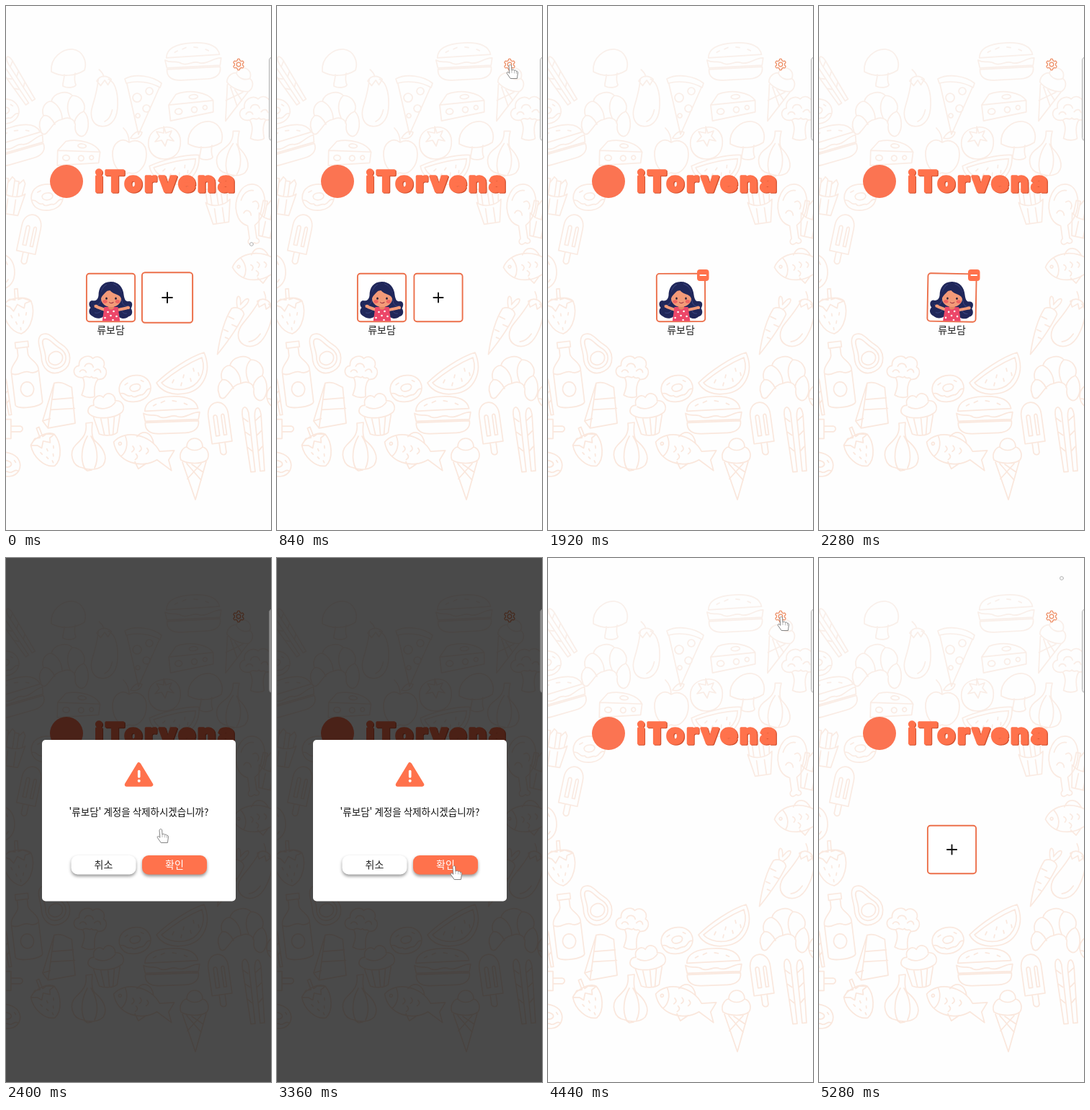
An HTML page with a canvas for the animation above (5.4 s loop, 368 by 726 pixels).

```html
<!DOCTYPE html>
<html lang="ko">
<head>
<meta charset="utf-8">
<title>Account removal</title>
<style>
html, body { margin: 0; width: 100%; height: 100%; overflow: hidden; background: #fefefe; }
canvas { display: block; width: 368px; height: 726px; }
</style>
</head>
<body>
<canvas id="stage"></canvas>
<script>
const W = 368, H = 726, LOOP = 5400, STEP = 120;
const ORANGE = '#ff724c', FRAME = '#ec704b';
const KOREAN = '"Noto Sans CJK KR", "Noto Sans CJK JP", "Noto Sans CJK", sans-serif';
const USER = '류보담';
const ratio = window.devicePixelRatio || 1;

function fit(canvas) {
  canvas.width = W * ratio;
  canvas.height = H * ratio;
  const c = canvas.getContext('2d');
  c.scale(ratio, ratio);
  return c;
}
const ctx = fit(document.getElementById('stage'));

const food = {
  mushroom: 'M-24 6C-26-14-8-26 6-25 20-23 26-8 22 4 10 12-10 14-24 6ZM-6 10C-6 18-9 22-8 26 0 30 10 27 10 24 8 20 8 14 9 8',
  burger: 'M-37-7C-36-22-20-26 0-26 22-26 35-20 37-8ZM-39-4C-30 2-24-4-16 2-8 6 0-2 8 2 18 6 28-4 39-3L37 7H-37L-39-4M-37 9C-38 20-30 25-18 25H18C32 25 38 18 37 9ZM-14-18l5-2M2-20l5 1M18-16l4 2M-25-14l4-2',
  eggplant: 'M2-26C14-22 18-2 18 14 18 32 8 40-2 40-14 40-20 28-17 14-14 0-12-10-12-24M-14-22C-10-30-2-32 6-26L2-18-3-24-8-16ZM-5-29C-6-34-10-36-12-38M11 16C10 24 7 30 2 33',
  pizza: 'M-25-34C-10-42 14-38 26-28L24-22C10-30-8-32-23-28ZM-22-27L-6 43 23-22M-8-14a6 6 0 1 0 .1 0M9-22a5 5 0 1 0 .1 0M5 2a5 5 0 1 0 .1 0M-7 14a3 3 0 1 0 .1 0',
  croissant: 'M-32 22C-36 12-32 6-28 2-32-10-24-18-17-18-14-30 4-34 12-26 24-26 32-14 28-4 36 4 36 20 30 28 24 34 16 28 16 18 18 8 8 2-2 7-12 8-16 18-22 24-26 30-31 28-32 22ZM-28 2C-22 0-16 6-12 14M-17-18C-8-14-2-4-2 7M12-26C4-18 4-6 9 5M28-4C22-2 16 4 15 12',
  cheese: 'M-31-2L-20-16C0-22 24-16 31-4L30 12-30 20ZM-31-2L31-4M-18 4a5 4 0 1 0 .1 0M4 3a4 4 0 1 0 .1 0M19 2a3 3 0 1 0 .1 0M4-14a6 3 0 1 0 .1 0',
  cone: 'M-18-12C-22-22-14-30-10-30-10-46 12-46 12-30 20-28 22-18 18-12 10-6-8-6-18-12ZM-10-30C-4-24 6-24 12-30M-16-9L2 43 17-10M-10-7L10 16M10-7L-9 14M-3-6L13 5',
  broccoli: 'M-10 4C-24 6-26-10-16-12-18-24-4-30 2-24 10-32 22-22 18-14 26-10 24 4 12 4M-9 4C-4 12-6 20-8 28 0 32 8 30 10 28 8 18 8 10 12 4M-9 4C-4-2 0 6 3 1 6 6 10-1 12 4M-8-12C-6-18 2-18 4-12M6-7C10-12 14-10 15-6M-14-4C-12-8-7-8-5-4',
  apple: 'M0-14C-10-22-24-14-23 4-22 22-10 32 0 28 12 32 24 20 24 2 24-14 10-20 0-14ZM0-14C0-24-4-30-8-34M2-20C8-30 14-30 18-28 16-20 8-18 2-20',
  tomato: 'M0-22C16-24 24-12 22 3 20 18 8 23-2 22-16 21-24 10-22-4-20-16-10-21 0-22ZM-1-14L-11-16-7-9-13-2-4-4 1 4 4-5 13-3 7-10 10-17 2-14-1-23Z',
  garlic: 'M-4-32C-2-16-10-10-18-2-28 8-24 28-8 30 2 34 14 32 20 26 28 14 18 0 8-8 4-12 4-24 5-33ZM-2-14C-10 0-12 18-6 30M3-14C12 0 14 18 8 30M-6 31l4 3 6-1',
  melon: 'M-36 14C-20-2 10-22 30-28 42 0 28 26 2 29-14 32-30 26-36 14ZM-29 14C-12 0 10-14 27-21 34 0 22 20 2 23-12 25-24 20-29 14M-12 10l-2 4M2 3l-1 4M15-6l1 4M-1 14l-1 4M11 8l1 4M22 0l1 4',
  donut: 'M-22 1C-22-14-8-19 4-18 16-17 23-8 22 2 20 14 8 19-4 18-16 17-21 10-22 1ZM-7-1C-6-7 7-8 8-2 7 5-6 6-7-1M-20 4C-12 4-14 11-6 9-2 15 4 8 9 10 16 8 14 2 21 3M-13-7l4-2M10-10l3 2',
  fries: 'M-17-6C-8 2 8 2 17-6L11 25-11 25ZM-15-5V-24H-9V-1M-9-18L-4-27 0-24V0M0-22H6V-1M6-18L12-25 15-20 13-4M-6 4V24M5 4V24',
  popsicle: 'M-14 22V-16C-14-40 14-40 14-16V22ZM-4 22V36C-2 40 3 40 4 36V22M-7 12V-14C-7-18-2-18-2-14V12ZM4 12V-14C4-18 8-18 8-14V12Z',
  drumstick: 'M-6 18C-22 12-24-12-14-28-4-44 16-42 20-24 24-6 14 12 4 18L5 36C12 40 6 46 1 42-6 48-10 40-5 36ZM-12-18C-8-28 0-32 6-30M4-14C10-18 14-10 10-4M-10 0C-6-6 0-2 0 4',
  fish: 'M-43-8C-30-28 6-26 22-4L42-8 36 6 42 20 20 8C0 24-34 20-43-8ZM-28-18C-22-8-24 4-30 10M-12-20C-4-32 8-28 12-14M-10 15L-4 24 6 15M-34-9a2 2 0 1 0 .1 0M-16-6q5 4 0 8M-6-8q5 4 0 8M4-6q5 4 0 8M-10 4q5 4 0 8',
  strawberry: 'M0 30C-14 26-22 6-18-10-10-18 12-18 18-10 22 4 14 26 0 30ZM-18-10L-10-6-6 0 0-8 8-2 10-8 18-10 8-15 2-14 3-28-1-28-2-14-9-16ZM-10 5l1 3M0 4l0 3M10 4l-1 3M-5 14l1 3M5 14l-1 3M0 22v3',
  carrot: 'M-9-20C-4-26 6-26 10-20 10 0 4 30 0 46-6 26-12 0-9-20ZM-2-24C-14-40-6-46 0-30 4-50 14-42 3-24M-8-8h8M8 0h-7M-6 11h6M4 20h-4',
  avocado: 'M-2-30C10-30 10-16 16-6 26 10 16 28 0 28-18 28-24 12-16-4-12-14-12-28-2-30ZM-2-23C6-22 6-10 12-1 19 12 10 22 0 22-14 21-17 10-11-1-7-10-8-22-2-23ZM0-1a10 9 0 1 0 .1 0',
  bottle: 'M-9-46H9V-38H-9ZM-7-38V-28C-8-20-19-16-19-6V40C-17 47 17 47 19 40V-6C19-16 8-20 7-28V-38M-19-4C-10 2-2-8 6-3 12 0 16-2 19-4M0 10a9 10 0 1 0 .1 0',
  cake: 'M-10-30C0-34 8-28 14-26L22 22-14 31-22 22ZM-10-30L-14 31M-10-8L17-12M-12 6L20 2M-22 22L-12 18',
  cupcake: 'M-20 2C-30-4-22-14-16-12-18-24-6-28-2-22 4-32 16-24 14-16 26-16 28-2 20 2 10 8-10 8-20 2ZM-18 4L-12 28C-4 32 8 32 13 28L19 4M-8 7L-5 29M2 8V30M11 6L7 30M-14-10C-6-4 8-6 14-14',
  asparagus: 'M-9 46L-14-34C-14-46-7-48-5-36L-3 46ZM4 46L3-30C4-44 11-46 12-32L10 46ZM-14-30l7 6M-12-10l6 5M-10 12l5 5M3-24l8-6M4-4l7-6M4 18l6-6'
};

const backdrop = document.createElement('canvas');
paintBackdrop(fit(backdrop));

function paintBackdrop(c) {
  const tint = c.createLinearGradient(0, 40, 0, 690);
  tint.addColorStop(0, '#f9f0eb');
  tint.addColorStop(.3, '#faebe3');
  tint.addColorStop(1, '#fae6db');
  c.fillStyle = '#fefefe';
  c.fillRect(0, 0, W, H);
  c.lineJoin = c.lineCap = 'round';
  c.strokeStyle = tint;
  c.lineWidth = 1.7;

  // Placement is baked into the path so the tint follows the page height.
  const put = (kind, x, y, turn = 0, size = 1) => {
    const path = new Path2D();
    path.addPath(new Path2D(food[kind]), new DOMMatrix().translate(x, y).rotate(turn).scale(size));
    c.stroke(path);
  };

  put('asparagus', 14, 102, -32, .8);
  put('mushroom', 87, 85);
  put('burger', 260, 77, -3);
  put('eggplant', 138, 127, 5);
  put('pizza', 190, 135);
  put('croissant', 80, 150);
  put('cheese', 257, 137, -4);
  put('cone', 318, 122, 22, .92);
  put('broccoli', 348, 154, 0, 1.05);
  put('donut', -3, 146, 0, .95);
  put('burger', 15, 192, -16, .97);
  put('cheese', 101, 204, 4, .95);
  put('apple', 171, 203);
  put('tomato', 220, 190);
  put('mushroom', 277, 185);
  put('garlic', 316, 204, 6, .95);
  put('melon', 234, 221, 20, .9);
  put('fries', 9, 264, 8);
  put('donut', 57, 265);
  put('fries', 295, 276, -8);
  put('drumstick', 340, 286, -5);
  put('popsicle', 32, 321, 12, .95);
  put('fries', 367, 296, 12);
  put('fish', 356, 361, -12, .95);
  put('donut', -8, 368, 90, 1.1);
  put('strawberry', 17, 422, -8, 1.08);
  put('carrot', 313, 441, 25);
  put('eggplant', 351, 435, 28);
  put('avocado', 65, 481, -28);
  put('bottle', 27, 511, -7);
  put('asparagus', -3, 540, -10, .6);
  put('broccoli', 116, 512, 6);
  put('donut', 179, 530, -8);
  put('melon', 245, 508);
  put('croissant', 328, 516);
  put('cake', 75, 554, 4, 1.03);
  put('cupcake', 139, 564, -5);
  put('burger', 230, 567, -2);
  put('popsicle', 297, 583, -8);
  put('asparagus', 345, 599, -5);
  put('popsicle', -14, 586, -90, .95);
  put('strawberry', 55, 610, -25);
  put('garlic', 115, 610);
  put('fish', 191, 618, 8);
  put('cone', 261, 641);
  put('donut', 0, 635, 20, .9);
  put('donut', 384, 540);
}

function box(x, y, w, h, r) {
  ctx.beginPath();
  ctx.roundRect(x, y, w, h, r);
}

function disc(x, y, rx, ry, color) {
  ctx.fillStyle = color;
  ctx.beginPath();
  ctx.ellipse(x, y, rx, ry, 0, 0, Math.PI * 2);
  ctx.fill();
}

function shape(path, color) {
  ctx.fillStyle = color;
  ctx.fill(new Path2D(path));
}

function line(path, color, width) {
  ctx.strokeStyle = color;
  ctx.lineWidth = width;
  ctx.stroke(new Path2D(path));
}

function label(text, x, y, size, color = '#222') {
  ctx.font = `${size}px ${KOREAN}`;
  ctx.textAlign = 'center';
  ctx.fillStyle = color;
  ctx.fillText(text, x, y);
}

function at(x, y, draw, turn = 0, size = 1) {
  ctx.save();
  ctx.translate(x, y);
  ctx.rotate(turn);
  ctx.scale(size, size);
  draw();
  ctx.restore();
}

function brand() {
  disc(84, 243, 23, 23, '#fb7452');
  ctx.font = '800 39px Inter, "Open Sans", sans-serif';
  ctx.textAlign = 'center';
  ctx.letterSpacing = '3.4px';
  ctx.lineWidth = 3.4;
  for (const [shift, color] of [[1.2, '#d3512f'], [0, ORANGE]]) {
    ctx.fillStyle = ctx.strokeStyle = color;
    ctx.strokeText('iTorvena', 222 + shift, 257 + shift);
    ctx.fillText('iTorvena', 222 + shift, 257 + shift);
  }
  ctx.letterSpacing = '0px';
}

function gear() {
  ctx.beginPath();
  for (let i = 0; i < 72; i++) {
    const a = i / 72 * Math.PI * 2;
    const r = 6.6 + Math.tanh(3 * Math.cos(6 * a));
    ctx.lineTo(323 + r * Math.sin(a), 81 - r * Math.cos(a));
  }
  ctx.closePath();
  ctx.moveTo(325.8, 81);
  ctx.arc(323, 81, 2.8, 0, Math.PI * 2);
  ctx.strokeStyle = '#ee9068';
  ctx.lineWidth = 1.3;
  ctx.stroke();
}

function tile() {
  box(-33.6, -33.2, 67.2, 66.4, 4);
  ctx.fillStyle = '#fff';
  ctx.fill();
  ctx.strokeStyle = FRAME;
  ctx.lineWidth = 1.9;
  ctx.stroke();
}

function girl() {
  const skin = '#f39a78', hair = '#20275a', strand = '#39437d';
  tile();
  ctx.save();
  box(-32, -32, 64, 64.6, 3);
  ctx.clip();
  shape('M0-22C-12-22-17-13-17-3-18 4-22 5-26 4-31 5-31 11-28 14-32 18-30 24-25 26-19 31-10 29-7 22H8C11 30 20 31 25 26 30 25 31 19 28 15 31 10 30 5 25 5 21 6 19 3 18-4 17-14 11-22 0-22Z', hair);
  line('M-24 10C-19 13-15 9-13 3M-22 21C-16 23-12 18-12 14M25 11C20 14 16 10 15 3M22 22C17 23 14 18 14 14M4-19C9-17 13-12 14-7M-6-18C-10-16-12-12-13-8', strand, 1);
  line('M-8 17L-19 13M10 17L22 14.5', skin, 4);
  disc(-20.5, 12, 2.6, 2.2, skin);
  disc(24, 14, 2.6, 2.2, skin);
  shape('M-9 13H10L13 34H-12Z', '#ec4769');
  shape('M-4 10H5L4 15C2 17-2 17-3 15Z', '#e68463');
  disc(.5, 1.5, 14, 11.5, skin);
  shape('M-14.5 3C-15-12-7-18 1-18 10-18 16-11 15 3 14-3 9-4 4-6-1-9-2-11-3-14-4-8-12-5-14.5 3Z', hair);
  disc(-8, 5.5, 3.2, 2.4, '#ee6561');
  disc(9.5, 5.5, 3.2, 2.4, '#ee6561');
  disc(-6, 1.2, 1.3, 1.6, '#2b2036');
  disc(7, 1.2, 1.3, 1.6, '#2b2036');
  line('M-2 6.5C-1 8 2 8 3.5 6.5', '#a43b45', 1.1);
  for (const [x, y] of [[-4, 20], [4, 19], [0, 25], [8, 26], [-8, 28], [3, 31]]) disc(x, y, 1.3, 1.3, '#fff');
  ctx.restore();
}

function addTile() {
  tile();
  line('M-6.6 0H6.6M0-6.6V6.6', '#111', 1.9);
}

function minusBadge() {
  box(207, 365, 16.5, 16, 4);
  ctx.fillStyle = ORANGE;
  ctx.fill();
  line('M211.5 373H219', '#fff', 2.2);
}

function button(x, text, fill, color) {
  ctx.save();
  ctx.shadowColor = 'rgba(0,0,0,.42)';
  ctx.shadowBlur = 4 * ratio;
  ctx.shadowOffsetY = 2.5 * ratio;
  box(x, 412, 90, 26.5, 9);
  ctx.fillStyle = fill;
  ctx.fill();
  ctx.restore();
  label(text, x + 45, 430, 14, color);
}

function dialog() {
  ctx.fillStyle = 'rgba(0,0,0,.705)';
  ctx.fillRect(0, 0, W, H);
  box(50, 252, 269, 223.5, 5);
  ctx.fillStyle = '#fff';
  ctx.fill();
  const sign = 'M184.5 286L201.5 314H167.5Z';
  shape(sign, ORANGE);
  line(sign, ORANGE, 5.5);
  line('M184.7 295.5V303', '#fff', 3.6);
  disc(184.7, 308.8, 2, 2, '#fff');
  label(`'${USER}' 계정을 삭제하시겠습니까?`, 184.5, 357, 13.5, '#111');
  button(90.5, '취소', '#fff', '#222');
  button(189, '확인', ORANGE, '#fff');
}

function edgeHandle(dimmed) {
  box(365.5, 71, 8, 115.5, 4);
  ctx.fillStyle = dimmed ? '#8b8b8b' : '#f1f1f1';
  ctx.fill();
  ctx.strokeStyle = dimmed ? '#777' : '#b5b5b5';
  ctx.lineWidth = 1;
  ctx.stroke();
}

function hand() {
  const path = 'M-2 1C-2-1 1.4-1 1.6 1L2 7C4 5.6 5.4 6.6 5.6 7.4 7 6.6 8.2 7.4 8.4 8.4 10 8 10.6 9 10.4 11L9.4 18.5H.2L-4.6 11.6C-5.6 9.6-3.4 8.6-1.4 11Z';
  shape(path, '#fff');
  line(path, '#777', .9);
  line('M2 7V10.5M5.6 7.4V11M8.4 8.4V11.4', '#999', .7);
}

// Pointer stops: time, x, y
const route = [
  [0, 341, 330], [600, 324, 82], [1200, 324, 82], [1440, 332, 269],
  [1800, 215, 376], [2520, 215, 376], [3000, 246, 427], [3360, 246, 427],
  [3480, 267, 401], [3720, 280, 374], [4200, 324, 82], [4800, 324, 82],
  [5280, 337, 28], [LOOP, 337, 28]
];

function pointer(t) {
  const i = Math.max(1, route.findIndex(stop => stop[0] > t));
  const [t0, x0, y0] = route[i - 1], [t1, x1, y1] = route[i];
  const p = (t - t0) / (t1 - t0), e = p * p * (3 - 2 * p);
  return [x0 + (x1 - x0) * e, y0 + (y1 - y0) * e];
}

const within = (t, from, to) => t >= from && t < to;

function draw(t) {
  const asking = within(t, 2400, 3480);
  const editing = within(t, 960, 3480);
  ctx.lineJoin = ctx.lineCap = 'round';
  ctx.drawImage(backdrop, 0, 0, W, H);
  brand();
  gear();

  if (t < 960) {
    at(145.5, 404, girl);
    label(USER, 145.5, 453.5, 14);
    at(224, 404, addTile, 0, 1 + .045 * Math.max(0, 1 - t / 180));
  } else if (editing) {
    const swing = .018 * Math.cos((t - 1440) / 280 * Math.PI * 2);
    at(184.5, 404, girl, swing);
    label(USER, 184.5, 453.5, 14);
    minusBadge();
  } else if (t >= 4560) {
    at(184.5, 404, addTile);
  }

  if (asking) dialog();
  edgeHandle(asking);

  if (within(t, 1920, 2400)) return;
  const [x, y] = pointer(t);
  const overTarget = within(t, 600, 1320) || within(t, 1680, 3480) || within(t, 4200, 4920);
  if (overTarget) {
    at(x, y, hand);
  } else {
    disc(x, y, 2.4, 2.4, '#fff');
    ctx.strokeStyle = '#aaa';
    ctx.lineWidth = .9;
    ctx.stroke();
  }
}

const start = performance.now();
function tick() {
  const t = (performance.now() - start) % LOOP;
  draw(Math.floor(t / STEP) * STEP);
  requestAnimationFrame(tick);
}
tick();
</script>
</body>
</html>
```
